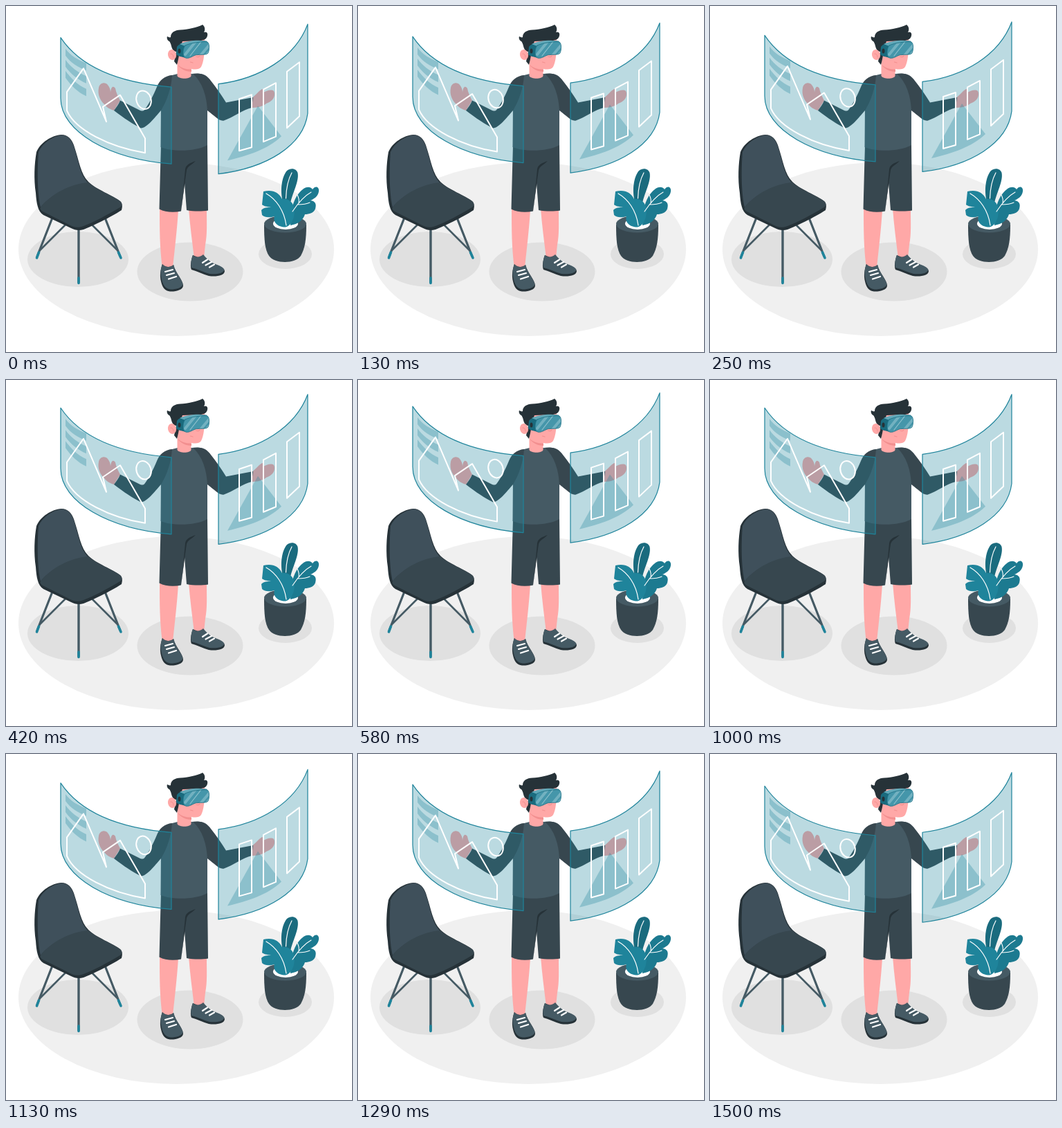
Recreate the animation shown at these times as an HTML page with a canvas. Size 500 px wide and 500 px high, loop 1540 ms.

```html
<!DOCTYPE html>
<html lang="en">
<head>
<meta charset="utf-8">
<title>Floating VR screens</title>
<style>
  html, body { margin: 0; width: 100%; height: 100%; overflow: hidden; background: #fff; }
  canvas { display: block; width: 500px; height: 500px; }
</style>
</head>
<body>
<canvas id="stage"></canvas>
<script>
const SIZE = 500, LOOP = 1540, STEPS = 37;
const PEAK = 17, LIFT = 10;
const ACCENT = '#1f849b', TEAL_DARK = '#1a6b7e', GLASS = 'rgba(31,132,155,.3)';
const SLATE = '#455a64', DARK = '#37474f', INK = '#263238';
const SKIN = '#ffa8a7', BLUSH = '#f28f8f', WHITE = '#fff';

const canvas = document.getElementById('stage');
const ctx = canvas.getContext('2d');
const ratio = window.devicePixelRatio || 1;
canvas.width = canvas.height = SIZE * ratio;
ctx.lineCap = ctx.lineJoin = 'round';

function fill(d, color) {
  ctx.fillStyle = color;
  ctx.fill(new Path2D(d));
}

function stroke(d, color, width) {
  ctx.strokeStyle = color;
  ctx.lineWidth = width;
  ctx.stroke(new Path2D(d));
}

function ellipse(x, y, rx, ry, color, angle = 0) {
  ctx.beginPath();
  ctx.ellipse(x, y, rx, ry, angle, 0, Math.PI * 2);
  ctx.fillStyle = color;
  ctx.fill();
}

function floor() {
  ellipse(246, 351.5, 228, 125.5, '#f0f0f0');
  ellipse(104, 366, 73, 40, '#e0e0e0');
  ellipse(266, 384, 76.5, 42.5, '#e0e0e0');
  ellipse(403.5, 358.5, 38.5, 21.5, '#e0e0e0');
}

function chair() {
  stroke('M86 316L49 353M124 316L161 353', SLATE, 2.6);
  stroke('M67 306L45 362M143 306L165 362', SLATE, 3.2);
  stroke('M47.5 356L44.5 364M162.5 356L166 364', ACCENT, 3.6);
  stroke('M105 321V399', SLATE, 3.4);
  stroke('M105 393V400.5', ACCENT, 3.6);
  fill('M44 211C50 197 66 187 80 186C90 186 95 193 98 201C106 225 108 243 119 254C130 265 155 274 165 282C169 286 168 291 167 295C150 306 125 318 112 323C105 325 100 324 94 321L54 302C46 297 44 285 43 270C40 250 41 228 44 211Z', INK);
  fill('M47 211C53 198 66 189 80 186.5C90 187 95 194 98 203C106 228 107 244 119 256C95 258 65 272 50 291C45 270 45 235 47 211Z', '#3f505b');
  fill('M119 255C132 267 158 275 166 283C169 287 167 290 163 292C148 301 128 312 112 318C105 321 99 320 93 317L53 297C50 295 49 293 50 291C65 272 92 257 119 255Z', DARK);
}

function plant() {
  fill('M373 316C373 338 374 352 380 361C388 373 418 373 426 361C432 350 434 338 434 316Z', DARK);
  ellipse(403.5, 315, 30.5, 12.5, SLATE);
  ellipse(404, 314.5, 18, 8.5, WHITE);
  fill('M400 282C396 268 398 247 406 238C412 233 420 235 421.5 241C424 253 414 270 411 285Z', TEAL_DARK);
  stroke('M404.5 278C405 262 408 250 413 241', WHITE, 1.2);
  fill('M412 300C414 285 419 272 430 264C435 261 440 261 443 265C447 259 453 261 452 268C451 275 445 279 440 281C447 282 449 286 447 293C445 299 438 301 432 301C429 310 422 315 411 317Z', '#1c7a90');
  fill('M372 268C385 265 394 269 399 279C406 278 413 281 416 290C419 303 413 318 404 319.5C394 320 385 313 388 304C381 306 374 306 370 302L369 295C372 291 378 291 383 291C377 290 372 289 370 287Z', ACCENT);
  stroke('M376 271C390 279 402 295 405 317', WHITE, 1.2);
  stroke('M441 269C430 275 422 285 414 297M423 284C424 280 423 277 421 273M421 287C427 287 433 287 439 284', WHITE, 1.1);
}

function legs() {
  fill('M222 292L249 295C247 325 244 350 241 378L226 379C222 350 222 320 222 292Z', SKIN);
  fill('M264 293L290 294C290 315 291 330 288 345L286 364L272 365C269 340 266 318 264 293Z', SKIN);
  fill('M226 373C223 381 222 390 224 398C226 407 230 412 237 412.5C246 413 256 410 256 404C256 396 245 386 242 374C238 378 230 378 226 373Z', INK);
  fill('M226 373C223 381 223 388 225 395C227 404 231 409 238 409.5C246 409.5 255 407 255.5 402C254 395 245 386 242 374C238 378 230 378 226 373Z', SLATE);
  fill('M270 360C267 369 266 376 268 381C276 383 285 388 293 390C303 391.5 316 390 316 383C315 376 305 376 298 372Z', INK);
  fill('M270 360C267 367 267 374 268 378C277 380 286 385 294 387C303 388 314 387 315.5 381C313 376 305 374 298 371C292 367 288 363 285 359C281 363 275 364 270 360Z', SLATE);
  stroke('M230 384L241 381M232 389L243 386M235 394.5L246 391M284 371L291 366.5M288.5 374.5L297 370M294 377.5L301 373.5', WHITE, 2.2);
  fill('M224 200H291L292 295.5C284 297 270 297 261 295L258 256L253 296.5C242 299 230 298 221.5 293.5Z', DARK);
  fill('M274 224C266 227 260 229 259 236C257 256 255 280 253 296.5L258 258L261 237C263 231 268 230 274 224Z', INK);
}

function body() {
  fill('M165 136.5L156 151C150 149 146 147 142 142C136 136 132 128 134 118C136 110 144 110 147 114C150 118 151 121 151 125C152 116 155 115 158 119C159 125 162 131 165 136.5Z', SKIN);
  fill('M355 133C362 128 365 123 370 120C374 121 372 125 370 126C378 121 388 119 388 126C389 134 382 139 376 141C370 146 362 147 354 147Z', SKIN);
  fill('M236 101L248 98H268C280 97 285 98 288 101L291 130V201C275 210.5 240 211 223.5 204L224 140C222 125 225 108 236 101Z', SLATE);
  fill('M240 100C229 101 222 107 218 117C213 129 207 141 201 149C199 152 197 152 194 151L165 136.5C163 142 159 147 156 151C170 162 184 171 195 176.5C204 176 214 162 224 151C232 138 239 119 240 100Z', DARK);
  fill('M270 98C282 96 290 99 296 108C303 117 311 128 318 139.5L357 132L355 147C342 150 328 161 315 165.5C308 167 302 159 291 151C290 130 284 110 270 98Z', DARK);
}

function head() {
  fill('M247.5 80L267.5 88V101C266 106 250 106 247.5 101Z', SKIN);
  fill('M249 50L287 48C287 70 286 80 282 88C279 92 274 92 268 91C260 90 252 87 248 84Z', SKIN);
  fill('M248 85C254 90 261 92 268 91.5V95C260 95 252 91 248 85Z', BLUSH);
  fill('M247 85L243 80L246 66C242 66 240 62 239 58C238 54 237 52 236 51C233 50 232 46 233 44C235 45 237 46 238 45C238 38 244 35 252 34.5C262 34 277 31 284 27C288 30 288 35 286 38C290 37 292 39 291 43C290 48 285 50 280 50L255 51C251 60 250 76 247 85Z', INK);
  ellipse(240, 70.5, 6, 7.5, SKIN, -.25);
  stroke('M238 69C241 69 242 71 242 74', BLUSH, 1);
  stroke('M266.5 81L270 82M275 73C277 74 279 74 280 72', BLUSH, 1.2);
  headset();
}

function headset() {
  const visor = 'M259 57C267 53 284 51 291 52C294.500 54 294 64 292 68C290 71 282 70 278 70.5C273 70 270 73 267 74C263 76 259 76 257 73C255 69 256 60 259 57Z';
  fill('M247 59C250 55 256 53 263 52C273 50 285 49 291 51L280 58L259 75C253 73 249 73 246 70Z', TEAL_DARK);
  fill('M251 55C262 50 283 48 291 52C280 52 267 54 259 58Z', '#62a9b9');
  ellipse(250.5, 65, 2, 3.5, INK);
  ctx.save();
  ctx.clip(new Path2D(visor));
  fill('M245 45H300V80H245Z', '#4596aa');
  stroke('M259 70L276 49M279 74L299 50', '#72b1c0', 4);
  stroke('M266 72L284 49M286 74L302 54', '#8dc0cc', 1.2);
  ctx.restore();
  stroke(visor, '#1c7085', .8);
}

function glass(d) {
  fill(d, GLASS);
  stroke(d, ACCENT, 1.2);
}

function leftScreen() {
  glass('M79 46.5C108 90 164 112 239 118V229C150 222 79 183 79 134Z');
  for (let i = 0; i < 3; i++) {
    const left = 62.5 + i * 16, right = 83.5 + i * 18.5;
    fill(`M86 ${left}C93 ${left + 10} 104 ${right - 5} 116 ${right}v10.5C104 ${right + 5.5} 93 ${left + 20} 86 ${left + 10}Z`, GLASS);
  }
  stroke('M88 125L112 91L145 168L140 146.5L165 129.5L201 192V213C150 205 100 180 88 152Z', WHITE, 2);
  ctx.beginPath();
  ctx.ellipse(199, 136.5, 10.5, 13.5, -.3, 0, Math.PI * 2);
  ctx.stroke();
}

function rightScreen() {
  glass('M307 113.5C367 106 418 75 436 27V156C430 203 376 235 307 243.5Z');
  fill('M364 145L398 189C378 208 350 217 320 224Z', GLASS);
  stroke('M337 135L355 129V205L337 210ZM372 121.5L390 112V189.5L372 197ZM406 95.500L424 82V160L406 177Z', WHITE, 2);
}

// Steady rise and fall, stepped at the animation's own pace.
function liftAt(ms) {
  const step = Math.floor(((ms + 5) % LOOP) / LOOP * STEPS);
  const gap = Math.abs(step - PEAK);
  const distance = Math.min(gap, STEPS - gap);
  return LIFT * (1 - distance / (STEPS / 2));
}

function draw(ms) {
  ctx.setTransform(ratio, 0, 0, ratio, 0, 0);
  ctx.fillStyle = WHITE;
  ctx.fillRect(0, 0, SIZE, SIZE);
  floor();
  chair();
  plant();
  legs();
  body();
  head();
  ctx.translate(0, -liftAt(ms));
  leftScreen();
  rightScreen();
}

const start = performance.now();
function tick() {
  draw(performance.now() - start);
  requestAnimationFrame(tick);
}
tick();
</script>
</body>
</html>
```
